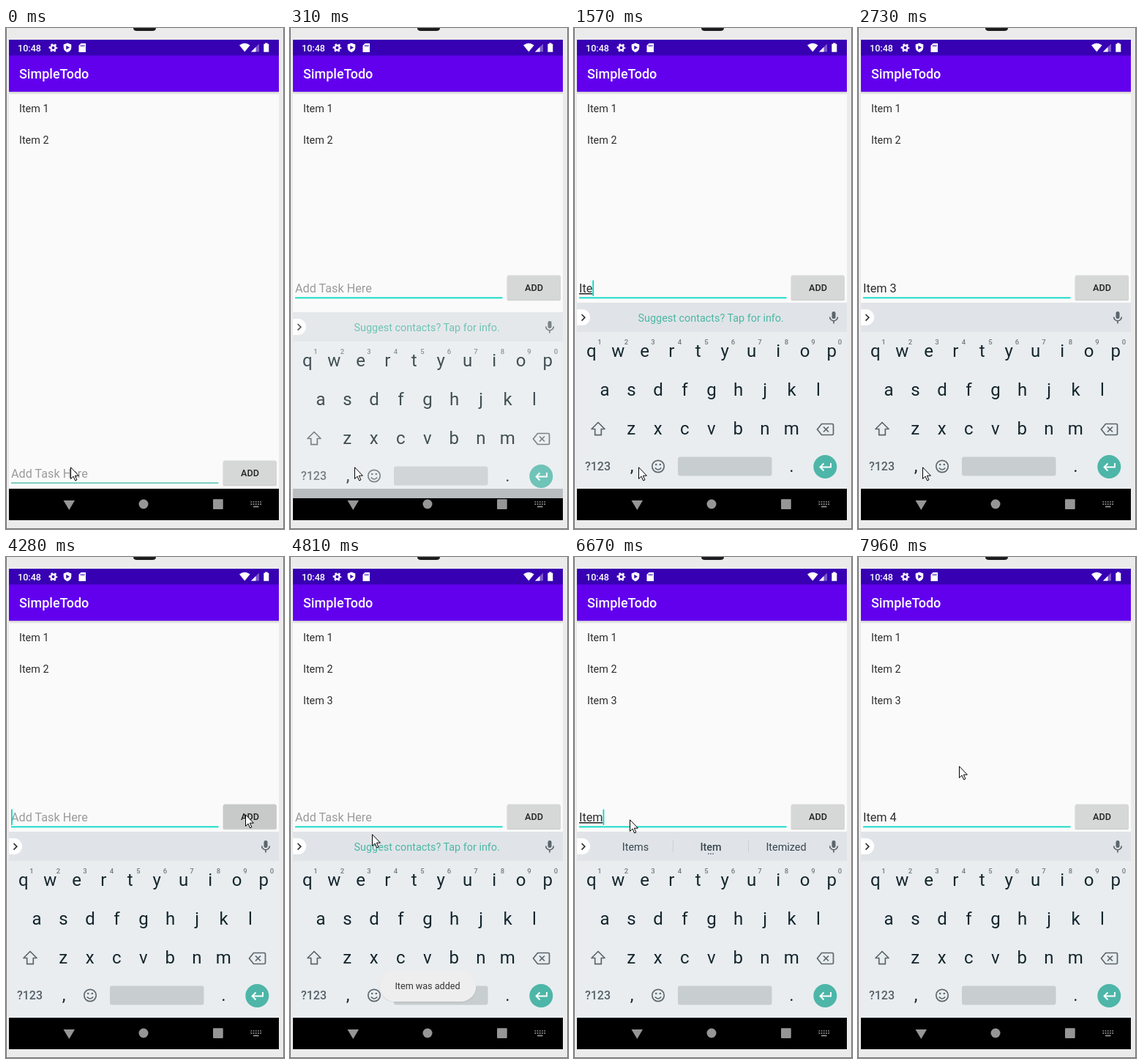
Animation, 380 px wide and 684 px high, one loop 8000 ms. Source, as an HTML page:

```html
<!DOCTYPE html>
<html lang="en">
<head>
<meta charset="utf-8">
<title>Todo list</title>
<style>
html, body { margin: 0; height: 100%; overflow: hidden; background: #ebebec; }
svg { display: block; width: 100vw; height: 100vh; font-family: Roboto, sans-serif; }
text { white-space: pre; }
.mid { text-anchor: middle; }
.med { font-weight: 500; }
.item { font-size: 14.4px; fill: #2c2c2c; }
.key { font-size: 24px; fill: #14262d; text-anchor: middle; }
.num { font-size: 9.5px; font-weight: 500; fill: #717a7f; text-anchor: middle; }
.word { font-size: 14.4px; fill: #37474f; text-anchor: middle; }
.line { fill: none; stroke: #5b666c; stroke-width: 1.7; }
</style>
</head>
<body>
<svg viewBox="0 0 380 684">
  <defs>
    <linearGradient id="fade" x2="0" y2="1">
      <stop stop-color="#000" stop-opacity=".2"/><stop offset="1" stop-color="#000" stop-opacity="0"/>
    </linearGradient>
  </defs>

  <!-- device frame -->
  <rect width="380" height="684" fill="#ebebec"/>
  <path d="M.5 0V684M379.5 0V684M0 683.5H380" stroke="#77777a"/>
  <path d="M174 0h31q0 4-5 4h-21q-5 0-5-4z" fill="#1c1c1e"/>
  <rect x="4" y="16" width="369" height="656" fill="#fafafa"/>

  <!-- status and app bar -->
  <rect x="4" y="37" width="369" height="50" fill="#6200ee"/>
  <rect x="4" y="16" width="369" height="21.5" fill="#3700b3"/>
  <rect x="4" y="87" width="369" height="4" fill="url(#fade)"/>
  <g fill="#fff">
    <text class="med" x="16" y="31.5" font-size="12.6">10:48</text>
    <g fill="none" stroke="#fff">
      <circle cx="64.5" cy="27" r="3.2" stroke-width="2.4"/>
      <circle cx="64.5" cy="27" r="5" stroke-width="1.8" stroke-dasharray="2.6 2.636" stroke-dashoffset="1.3"/>
    </g>
    <path d="M84 20.5l5.3 2v4q0 4.500-5.300 6.700q-5.300-2.200-5.300-6.700v-4z"/>
    <path d="M82.300 24l4.700 2.800l-4.700 2.800z" fill="#3700b3"/>
    <path d="M102.500 21h6.500v12h-9.500v-9z"/>
    <path d="M102.700 23v2.500m2-2.500v2.500m2-2.500v2.500" stroke="#3700b3"/>
    <path d="M319 23.500q7.300-5.500 14.600 0L326.300 32.500z"/>
    <path d="M335 32.500h11v-11z" opacity=".35"/>
    <path d="M335 32.500h6.500v-6.500z"/>
    <path d="M354 20.500h3.500v1.300h1.800v11h-7v-11h1.700z"/>
    <text class="med" x="18" y="69.300" font-size="18">SimpleTodo</text>
  </g>

  <text class="item" x="18" y="114.500">Item 1</text>
  <text class="item" x="18" y="157.500">Item 2</text>
  <text class="item" x="18" y="200.500" id="third">Item 3</text>

  <!-- task field and button -->
  <g id="form">
    <text id="hint" x="7" y="361" font-size="16.200" fill="#9b9b9b">Add Task Here</text>
    <text id="typed" x="7" y="361" font-size="16.200" fill="#2c2c2c"></text>
    <rect id="accent" x="7" y="367.500" width="283.500"/>
    <rect id="caret" y="344.500" width="1.800" height="21.500" fill="#03dac5"/>
    <rect x="296.500" y="338.500" width="73.500" height="33.800" rx="2" fill="#000" opacity=".17"/>
    <rect id="button" x="297" y="337.500" width="72.500" height="33.300" rx="2"/>
    <text class="mid med" x="333.500" y="359" font-size="12.600" fill="#222">ADD</text>
  </g>

  <rect x="4" y="629" width="369" height="43"/>

  <g id="board">
    <rect x="4" y="375" width="369" height="254" fill="#e9edf0"/>
    <rect x="4" y="375" width="369" height="40" fill="#e0e4e8"/>
    <path d="M4 384h7a11 11 0 0 1 0 22h-7z" fill="#fff"/>
    <path d="M10.500 391l4.300 4.300l-4.300 4.300" class="line" style="stroke:#333"/>
    <g id="mic">
      <rect x="352.500" y="387" width="5" height="10" rx="2.500" fill="#5b666c"/>
      <path d="M349.700 394.500a5.300 5.300 0 0 0 10.600 0M355 400v3.500" class="line" stroke-width="1.500"/>
    </g>
    <text id="notice" class="mid" x="187.200" y="401" font-size="14.400" fill="#4db6a5">Suggest contacts? Tap for info.</text>
    <g id="words">
      <path d="M135.500 387v16m103-16v16" stroke="#cbd0d4"/>
      <text class="word" x="84" y="400.500"></text>
      <text class="word med" x="187" y="400.500"></text>
      <text class="word" x="290" y="400.500"></text>
      <path d="M183 405.300h8" stroke="#5b666c" stroke-width="1.500" stroke-dasharray="1.600"/>
    </g>
    <g id="keys"></g>
    <path class="line" d="M33 538.500l9 9h-4.700v8.200h-8.600v-8.200h-4.700z" stroke-linejoin="round"/>
    <path class="line" d="M338.500 540.500h14.500q1.500 0 1.500 1.500v12q0 1.500-1.500 1.500h-14.500l-6-7.500zM341 544.500l7 7m0-7l-7 7"/>
    <text class="mid med" x="32.500" y="604" font-size="16" fill="#566168">?123</text>
    <circle class="line" cx="115" cy="598.500" r="8.200"/>
    <path class="line" d="M110.800 600.500q4.200 5 8.400 0"/>
    <circle cx="112.200" cy="596" r="1.300" fill="#5b666c"/>
    <circle cx="117.800" cy="596" r="1.300" fill="#5b666c"/>
    <rect x="142" y="585.500" width="128.500" height="26" rx="3" fill="#c8cdd0"/>
    <circle cx="343.300" cy="599" r="16" fill="#4db6a8"/>
    <path d="M351 594v5.500h-14.500m5-5l-5 5l5 5" fill="none" stroke="#fff" stroke-width="1.900"/>
  </g>

  <!-- navigation -->
  <g fill="#969696">
    <path d="M78.500 645h15.500l-7.700 13z"/>
    <circle cx="188" cy="650" r="6.500"/>
    <rect x="283" y="643.300" width="13.700" height="13.700" rx="1"/>
    <path d="M334.500 647h14.500m-14.500 3.200h14.500" stroke="#969696" stroke-width="1.700" stroke-dasharray="1.700 1.500"/>
    <path d="M338 653.500h7.500" stroke="#969696" stroke-width="1.700"/>
  </g>

  <g id="toast">
    <rect x="122" y="565.500" width="133" height="43" rx="21.500" fill="#000" opacity=".06"/>
    <rect x="122.500" y="564.500" width="132" height="42.500" rx="21.200" fill="#eee"/>
    <text class="mid" x="188" y="590" font-size="12.600" fill="#333">Item was added</text>
  </g>

  <path id="mouse" d="M.5 .8v15.700l3.600-3.400l2.500 5.800l2.300-1l-2.500-5.700h5z" fill="#fff" stroke="#000"/>
</svg>
<script>
const $ = id => document.getElementById(id);
const LOOP = 8000;

// each list holds [start time, value...]
const typing = [[0, ''], [1330, 'I'], [1450, 'It'], [1570, 'Ite'], [1710, 'Item'], [1860, 'Item '],
  [2230, 'Item 3'], [4280, ''], [6130, 'I'], [6250, 'It'], [6370, 'Ite'], [6670, 'Item'],
  [6790, 'Item '], [7290, 'Item 4']];
const stems = ['Items', 'Item', 'Itemized'], next = ['is', 'in', 'I'];
const bar = [[0, 'notice'], [1710, stems], [1860, next], [2230, ''], [4540, 'notice'],
  [6670, stems], [6790, next], [7290, '']];
const blink = [[0, 0], [430, 1], [580, 0], [1080, 1], [2730, 0], [3250, 1], [3800, 0],
  [4280, 1], [4810, 0], [5080, 1], [5580, 0], [6130, 1], [7810, 0]];
const press = [[0, '#d6d7d7'], [3920, '#cfd0d0'], [4040, '#c8c9c9'], [4420, '#d0d1d1'], [4540, '#d6d7d7']];
const path = [[0, 88, 599], [3130, 97, 592], [3250, 170, 532], [3370, 251, 459], [3520, 292, 400],
  [3650, 311, 349], [3800, 322, 353], [3920, 327, 351], [4540, 302, 355], [4690, 210, 366],
  [4810, 112, 378], [4960, 86, 366], [5080, 77, 358], [5580, 76, 357], [5730, 76, 358], [7960, 138, 285]];

const at = (list, t) => list.findLast(k => k[0] <= t);
const ramp = (t, a, b) => Math.min(1, Math.max(0, (t - a) / (b - a)));
const show = (id, on) => $(id).style.display = on ? '' : 'none';

// keyboard letters
const label = (cls, x, y, s) => `<text class="${cls}" x="${x}" y="${y}">${s}</text>`;
const row = (s, x, y) => [...s].map((c, i) => label('key', x + i * 36.5, y, c)).join('');
$('keys').innerHTML = row('qwertyuiop', 23.7, 448.5) + row('asdfghjkl', 42, 501.5) +
  row('zxcvbnm', 78.3, 554.5) + label('key', 79, 606, ',') + label('key', 297.5, 606, '.') +
  [...'1234567890'].map((c, i) => label('num', 35 + i * 36.5, 431.5, c)).join('');

const slots = document.querySelectorAll('.word');

function draw(t) {
  const open = t >= 310, sliding = t < 430;
  $('form').setAttribute('transform', `translate(0 ${open ? 0 : 253})`);
  $('accent').setAttribute('fill', open ? '#03dac5' : '#3db8a3');
  $('accent').setAttribute('height', open ? 1.8 : 1.3);
  show('board', open);
  $('board').setAttribute('transform', `translate(0 ${sliding ? 13 : 0})`);
  $('board').setAttribute('opacity', sliding ? .8 : 1);

  const text = at(typing, t)[1];
  $('typed').textContent = text;
  $('typed').style.textDecoration = /^\w+$/.test(text) ? 'underline' : 'none';
  show('hint', !text);
  show('caret', at(blink, t)[1]);
  $('caret').setAttribute('x', 7 + (text && $('typed').getComputedTextLength()));

  const tips = at(bar, t)[1], list = Array.isArray(tips);
  show('notice', tips === 'notice');
  show('words', list);
  if (list) slots.forEach((s, i) => s.textContent = tips[i]);

  $('button').setAttribute('fill', at(press, t)[1]);
  show('third', t >= 4420);
  $('toast').setAttribute('opacity', ramp(t, 4300, 4690) * (1 - ramp(t, 6370, 6670)));

  const [, x, y] = at(path, t);
  $('mouse').setAttribute('transform', `translate(${x} ${y})`);
}

function tick() {
  draw(performance.now() % LOOP);
  requestAnimationFrame(tick);
}
tick();
</script>
</body>
</html>
```
